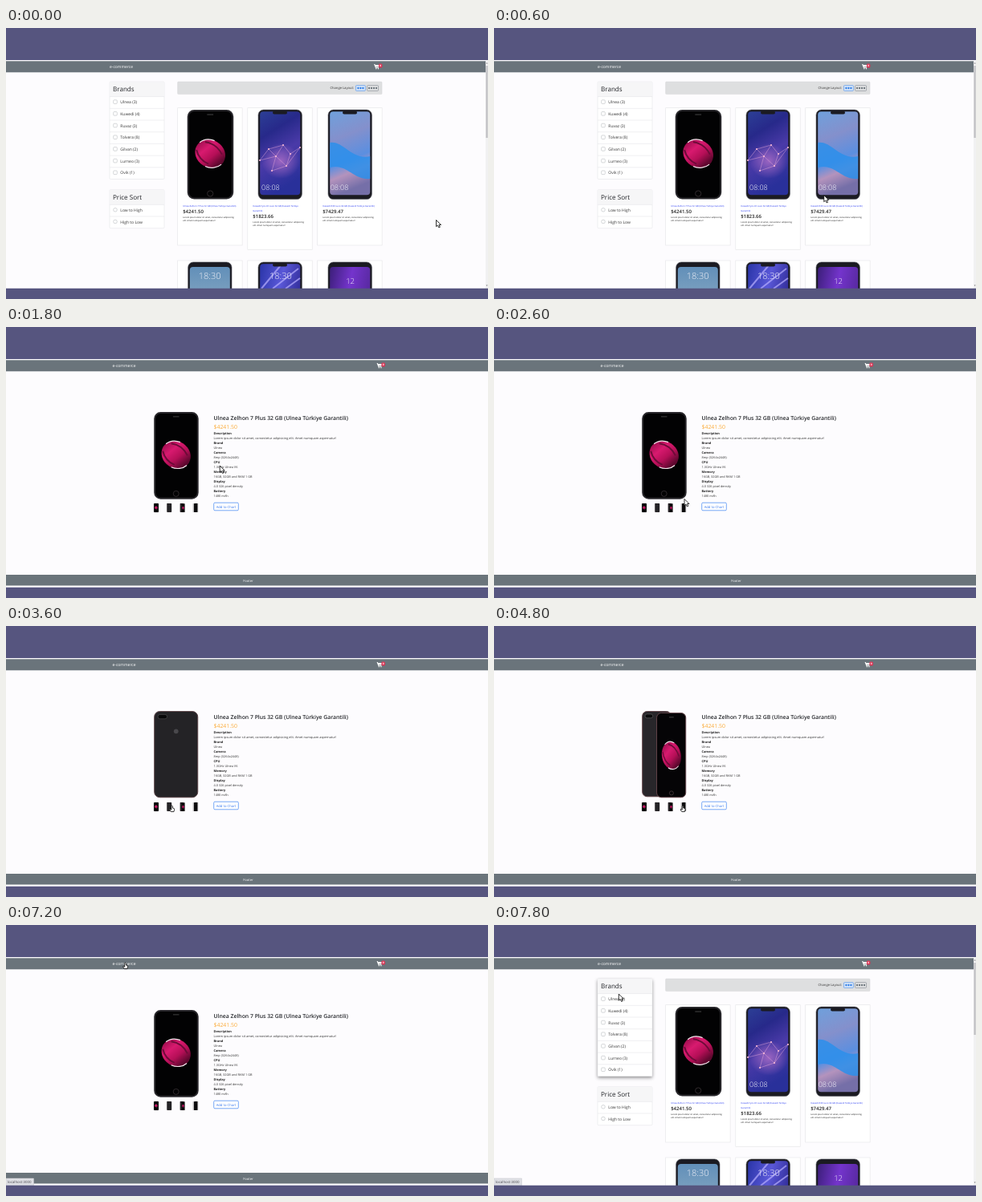
These frames come from a looping animation (600x338 px, 8 s). An HTML page:

```html
<!DOCTYPE html>
<html lang="en">
<head>
<meta charset="utf-8">
<title>Phone shop</title>
<style>
  html, body { margin: 0; width: 100%; height: 100%; overflow: hidden; background: #56557f; }
  svg { display: block; width: 100%; height: 100%; font-family: "Open Sans", "Noto Sans", sans-serif; text-rendering: geometricPrecision; }
  .shadow { filter: drop-shadow(0 2px 2.2px rgba(0, 0, 0, .45)); }
</style>
</head>
<body>
<svg id="stage" viewBox="0 0 600 338">
  <defs>
    <linearGradient id="ball" x2="1" y2=".3">
      <stop stop-color="#8f0b46"/><stop offset=".4" stop-color="#d81a6f"/><stop offset=".7" stop-color="#b50f57"/><stop offset="1" stop-color="#5f082f"/>
    </linearGradient>
    <linearGradient id="network" x2=".3" y2="1">
      <stop stop-color="#2c3f96"/><stop offset=".3" stop-color="#27298a"/><stop offset=".6" stop-color="#4a3aa8"/><stop offset="1" stop-color="#29309a"/>
    </linearGradient>
    <radialGradient id="glow"><stop stop-color="#b070c8" stop-opacity=".8"/><stop offset="1" stop-color="#b070c8" stop-opacity="0"/></radialGradient>
    <linearGradient id="beach" x2=".2" y2="1">
      <stop stop-color="#6fa0dc"/><stop offset=".35" stop-color="#8490cc"/><stop offset=".65" stop-color="#5b8fe0"/><stop offset=".8" stop-color="#b493bd"/><stop offset="1" stop-color="#756fa8"/>
    </linearGradient>
    <linearGradient id="mist" x2="0" y2=".4"><stop stop-color="#628fb9"/><stop offset="1" stop-color="#7fa3c0"/></linearGradient>
    <linearGradient id="streak" x2="1" y2=".5"><stop stop-color="#2a35a8"/><stop offset=".5" stop-color="#5a58d8"/><stop offset="1" stop-color="#2b2690"/></linearGradient>
    <linearGradient id="dusk" x2="1" y2=".4"><stop stop-color="#3c1f7a"/><stop offset=".5" stop-color="#7434cc"/><stop offset="1" stop-color="#55289c"/></linearGradient>

    <g id="orb" transform="rotate(32)">
      <ellipse rx="19.5" ry="17" fill="url(#ball)"/>
      <path d="M-17 5Q-8 14 5 12M-13-9Q0-15 13-7" fill="none" stroke="#6d0b38" stroke-width="2"/>
      <path d="M-18.5-5A19.5 17 0 0 1-4-16.6M18.8 4A19.5 17 0 0 1 3 16.6" fill="none" stroke="#f5e8ee" stroke-width="1.2"/>
    </g>
    <g id="front">
      <rect x="1" y="1" width="55.5" height="109.5" rx="7.5" fill="#020203" stroke="#28272b" stroke-width="2"/>
      <path d="M25 6h7" stroke="#444" stroke-linecap="round"/>
      <circle cx="28.5" cy="104.5" r="3.6" fill="none" stroke="#3b3438" stroke-width=".8"/>
      <use href="#orb" x="28.5" y="54.8"/>
    </g>
    <g id="back">
      <rect x=".5" y=".5" width="56" height="110" rx="7" fill="#242326" stroke="#5c4549"/>
      <rect x="5" y="4.5" width="12" height="5.5" rx="2.7" fill="#09090a" stroke="#555" stroke-width=".6"/>
      <circle cx="28.5" cy="26" r="3" fill="#49484c"/>
    </g>
    <g id="pair">
      <rect x=".5" y=".5" width="37" height="109" rx="6" fill="#28262a" stroke="#604348"/>
      <rect x="4" y="4" width="10" height="5" rx="2.5" fill="#09090a" stroke="#666" stroke-width=".6"/>
      <rect x="19" y="2.5" width="37.5" height="108" rx="6" fill="#050406" stroke="#65464b"/>
      <path d="M35 8h6" stroke="#444"/>
      <circle cx="38" cy="105" r="2.6" fill="none" stroke="#554348" stroke-width=".7"/>
      <use href="#orb" transform="translate(38 57) scale(.66 1)"/>
    </g>
    <g id="side">
      <rect width="57" height="111" fill="#e9e7e9"/>
      <rect x="12" width="36" height="111" rx="5" fill="#0c0b0d"/>
      <path d="M6 2v107" stroke="#2d2a2d" stroke-width="3"/>
    </g>
  </defs>
  <g id="listPage"></g>
  <g id="detailPage"></g>
  <g id="status"><rect y="316" width="68" height="9" fill="#dfe0e5" stroke="#c6c6cc" stroke-width=".5"/><text x="2" y="322" font-size="4.4" fill="#4a4a50"></text></g>
  <path d="M0 0H600V40H0ZM0 324.8H600V338H0Z" fill="#56557f"/>
  <g id="cursor" stroke="#000" stroke-width=".8" fill="#fff" stroke-linejoin="round">
    <path id="arrow" d="M0 0V8.2L1.9 6.5L3.3 9.4L4.8 8.8L3.5 6H6Z"/>
    <path id="hand" d="M-.8.6Q0-.4.8.6V3L2.6 3.5Q3.2 3.9 3 5.4L2.4 7.6H-1.2L-3 5Q-2.8 4-1.7 4.6L-.8 5.2Z"/>
  </g>
</svg>
<script>
const $ = id => document.getElementById(id);
const rect = (x, y, w, h, fill, attrs = '') => `<rect x="${x}" y="${y}" width="${w}" height="${h}" fill="${fill}" ${attrs}/>`;
const text = (x, y, size, str, fill = '#333', attrs = '') =>
  `<text x="${x}" y="${y}" font-size="${size}" fill="${fill}" ${attrs}>${str}</text>`;
const place = (id, x, y, scale) => `<use href="#${id}" transform="translate(${x} ${y}) scale(${scale})"/>`;
const border = 'stroke="#e4e4e7" stroke-width=".6"';
const bold = 'font-weight="600"';
const middle = 'text-anchor="middle"';
const LOREM = ['Lorem ipsum dolor sit amet, consectetur adipisicing', 'elit. Amet numquam aspernatur!'];
const PHONE = 'Ulnea Zelhon 7 Plus 32 GB (Ulnea Türkiye Garantili)';

function navbar(width, shift) {
  return rect(0, 39, 600, 287, '#fdfcfe') + rect(0, 41.3, width, 14, '#6a747b') +
    text(129 + shift, 50, 5, 'e-commerce', '#fff') +
    `<g transform="translate(${458 + shift} 45)" fill="#fff"><path d="M0 0H1.3L1.6.9H6.8L6 3.6H2.4L2.6 4.3H6V5H2Z"/>
     <circle cx="2.8" cy="5.8" r=".7"/><circle cx="5.4" cy="5.8" r=".7"/></g>` +
    rect(463.9 + shift, 44.5, 4.5, 4.9, '#dc3556', 'rx="1.5"') +
    text(466.1 + shift, 48.1, 3.2, '0', '#fff', middle + ' font-weight="700"');
}

function filterCard(y, title, rows, radius) {
  const headerEnd = y + 18.6, pitch = 14.7;
  return rect(129, y, 68, 18.6 + pitch * rows.length, '#fff', border + ' rx="1.2"') +
    rect(129.3, y + .3, 67.4, 18.3, '#f6f6f7') + text(133, y + 12, 8.1, title, '#24262a') +
    rows.map((label, i) => {
      const top = headerEnd + pitch * i;
      return `<path d="M129 ${top}H197" ${border}/>` +
        rect(133.7, top + 4.2, 4.6, 4.6, '#fff', `rx="${radius}" stroke="#b9bcc0" stroke-width=".6"`) +
        text(142.3, top + 8.5, 5, label);
    }).join('');
}

function layoutButton(x, w, dots, color, fill) {
  let out = rect(x, 71.6, w, 6.8, fill, `rx="1" stroke="${color}" stroke-width=".5"`);
  for (let i = 0; i < dots; i++)
    out += `<circle cx="${x + w / 2 + (i - (dots - 1) / 2) * 3}" cy="75" r="1.15" fill="${color}"/>`;
  return out;
}

function handset(x, y, wallpaper, notch, extra = '') {
  return rect(x, y, 54.4, 111.6, '#1b1b22', 'rx="6.5" stroke="#55565f" stroke-width=".6"') +
    rect(x + 2.2, y + (notch ? 2.2 : 6), 50, notch ? 104 : 98, `url(#${wallpaper})`, 'rx="4"') +
    extra + (notch ? rect(x + 18, y + 1.5, 18, 4, '#1b1b22', 'rx="2"') : '');
}

function productCard(x, height, titleLines, price) {
  let y = 223.2;
  let out = rect(x, 99.7, 80.4, height, '#fff', border);
  for (const line of titleLines) { out += text(x + 6.5, y, 2.8, line, '#2a3cf0'); y += 5.8; }
  out += text(x + 6.5, y + 1.7, 6, price, '#222', bold);
  LOREM.forEach((line, i) => out += text(x + 6.5, y + 8.3 + i * 3.6, 2.65, line, '#111'));
  return out;
}

const clock = (x, y, str, size = 9) => text(x, y, size, str, '#f3f3fa', 'font-weight="300"');

function networkLines() {
  const nodes = [[316, 165], [327, 151], [336, 160], [345, 146], [354, 157], [366, 149], [349, 172], [331, 178]];
  const path = 'M' + nodes.map(p => p.join(' ')).join('L') + 'L336 160L349 172L354 157M327 151L345 146M316 165L336 160';
  return '<ellipse cx="342" cy="166" rx="24" ry="22" fill="url(#glow)"/>' +
    `<path d="${path}" fill="none" stroke="#e2a4d8" stroke-width=".6" opacity=".8"/>` +
    nodes.map(([x, y]) => `<circle cx="${x}" cy="${y}" r="1.1" fill="#f7b7d5"/>`).join('');
}

const wave = '<path d="M403.2 143C420 140 430 165 453.2 160V188C432 190 424 168 403.2 174Z" fill="#2c90ec" opacity=".85"/>';
const rays = '<path d="M318 325L342 296M332 325L364 300M348 325L366 312" stroke="#b9b0ff" stroke-width="2" opacity=".7"/>';

$('listPage').innerHTML = navbar(597, 0) +
  rect(597, 40.5, 3, 285, '#f1f1f2') + rect(597.4, 47, 2.3, 90, '#c1c1c4') +
  '<path d="M597.6 44.5L598.6 43L599.6 44.5ZM597.6 320.5L598.6 322L599.6 320.5Z" fill="#777"/>' +
  rect(129, 67, 68, 121.5, '#fff', 'id="brandShadow" class="shadow"') +
  filterCard(67, 'Brands', ['Ulnea (3)', 'Kuwedi (4)', 'Ruvaz (3)', 'Tolvera (8)', 'Gilvan (2)', 'Lurneo (3)', 'Ovik (1)'], 1) +
  filterCard(201.7, 'Price Sort', ['Low to High', 'High to Low'], 2.3) +
  rect(213.6, 67, 254.4, 15.6, '#dedfe0', 'stroke="#d6d7d9" stroke-width=".5" rx="1"') +
  text(403.5, 76.1, 4.1, 'Change Layout:') +
  layoutButton(435.4, 12, 3, '#2f7de6', '#d3e3f8') + layoutButton(449.5, 14, 4, '#6c757d', '#e0e1e2') +
  rect(213.7, 99.7, 80.4, 171.3, '#fff', 'id="cardShadow" class="shadow"') +
  productCard(213.7, 171.3, [PHONE], '$4241.50') +
  productCard(300.8, 176.8, ['Kuwedi Fyra 20 Luxo 64 GB (Kuwedi Türkiye', 'Garantili)'], '$1823.66') +
  productCard(387.7, 171.3, ['Kuwedi R30 Luxo 64 GB (Kuwedi Türkiye Garantili)'], '$7429.47') +
  place('front', 225.7, 102, 1) +
  handset(314, 102, 'network', true, networkLines() + clock(318, 202, '08:08')) +
  handset(401, 102, 'beach', true, wave + clock(403.7, 202, '08:08')) +
  [213.7, 300.8, 387.7].map(x => rect(x, 290, 80.4, 60, '#fff', border)).join('') +
  handset(226.6, 292, 'mist', false, clock(239.8, 313, '18:30', 11)) +
  handset(314, 292, 'streak', true, rays + clock(328, 313, '18:30', 11)) +
  handset(401, 292, 'dusk', false, clock(423.2, 319, '12', 9.5)) +
  `<g id="addButton">${rect(238.5, 254.6, 31, 10, '#0d6efd', 'rx="1.2"')}${text(254, 261.2, 4.2, 'Add to Chart', '#fff', middle)}</g>`;

const specs = [
  ['Description', LOREM.join(' ')], ['Brand', 'Ulnea'], ['Camera', '8mp (3264x2448)'], ['CPU', '1.3GHz Ulnea V6'],
  ['Memory', '16GB, 32GB and RAM 1 GB'], ['Display', '4.0 326 pixel density'], ['Battery', '1480 mAh'],
];
const VIEWS = ['front', 'back', 'pair', 'side'];
const THUMBS = [184, 200.2, 216.6, 232.5];

$('detailPage').innerHTML = navbar(600, 3.5) +
  `<use id="mainView" transform="translate(184.2 106) scale(.965 .975)"/>` +
  VIEWS.map((view, i) => place(view, THUMBS[i], 220, i === 3 ? '.125 .1' : '.105 .1')).join('') +
  text(258.5, 116, 6.85, PHONE, '#24262a', bold) +
  text(258.5, 127, 6.9, '$4241.50', '#fbab38') +
  specs.map(([name, value], i) =>
    text(258.5, 134.4 + i * 12, 3.9, name, '#222', 'font-weight="700"') + text(258.5, 140.4 + i * 12, 3.87, value)).join('') +
  rect(258.7, 219.2, 30.6, 9.6, '#fff', 'rx="1.2" stroke="#3b82f2" stroke-width=".7"') +
  text(274, 225.6, 4.2, 'Add to Chart', '#3577ee', middle) +
  rect(0, 309, 600, 13.5, '#6a747b') + text(301.5, 317.5, 4.1, 'Footer', '#fff', middle);

// Cursor path: time, x, y
const PATH = [
  [0, 535.5, 239.5], [150, 535.5, 239.5], [1100, 265.5, 172.5], [1400, 266.2, 173], [1800, 266.2, 173],
  [2600, 237, 214.5], [3000, 204, 224], [3500, 204, 224], [3900, 220, 224], [4300, 220, 224], [4700, 235, 224],
  [5200, 235, 224], [5700, 188, 224], [6200, 188, 224], [7000, 148.5, 47], [7400, 148.5, 47], [7800, 155.3, 86], [8000, 155.3, 86],
];
const DURATION = 8000, OPEN_DETAIL = 1800, BACK_TO_LIST = 7500;
const VIEW_STARTS = [3200, 4200, 5000, 5900];
const clamp = v => Math.max(0, Math.min(1, v));
const show = (id, visible) => $(id).setAttribute('visibility', visible ? 'visible' : 'hidden');

function cursorAt(t) {
  const i = PATH.findIndex(p => p[0] > t);
  const [t0, x0, y0] = PATH[i - 1], [t1, x1, y1] = PATH[i];
  const u = (t - t0) / (t1 - t0), e = u * u * (3 - 2 * u);
  return [x0 + (x1 - x0) * e, y0 + (y1 - y0) * e];
}

function draw(t) {
  const [x, y] = cursorAt(t);
  const detail = t >= OPEN_DETAIL && t < BACK_TO_LIST;
  const onLogo = detail && y < 53;
  const onThumb = detail && y > 219 && THUMBS.some(left => x >= left && x <= left + 7);
  const onPhone = t < OPEN_DETAIL && x < 283;
  const hand = onLogo || onThumb || onPhone;

  $('listPage').style.display = detail ? 'none' : '';
  $('detailPage').style.display = detail ? '' : 'none';
  const clicks = VIEW_STARTS.filter(start => t >= start).length;
  $('mainView').setAttribute('href', '#' + VIEWS[clicks % VIEWS.length]);

  const cardHover = t < OPEN_DETAIL ? clamp((t - 900) / 250) : 0;
  $('cardShadow').setAttribute('opacity', cardHover);
  $('addButton').setAttribute('opacity', cardHover);
  $('brandShadow').setAttribute('opacity', clamp((t - 7600) / 150));

  const phoneLink = t >= 1350 && t < OPEN_DETAIL;
  show('status', phoneLink || onLogo || t >= BACK_TO_LIST);
  const [bubble, label] = $('status').children;
  bubble.setAttribute('width', phoneLink ? 68 : 34.5);
  label.textContent = 'localhost:3000' + (phoneLink ? '/phone-detail/1' : '');

  $('cursor').setAttribute('transform', `translate(${x} ${y})`);
  show('hand', hand);
  show('arrow', !hand);
}

function tick() {
  draw(performance.now() % DURATION);
  requestAnimationFrame(tick);
}
tick();
</script>
</body>
</html>
```
